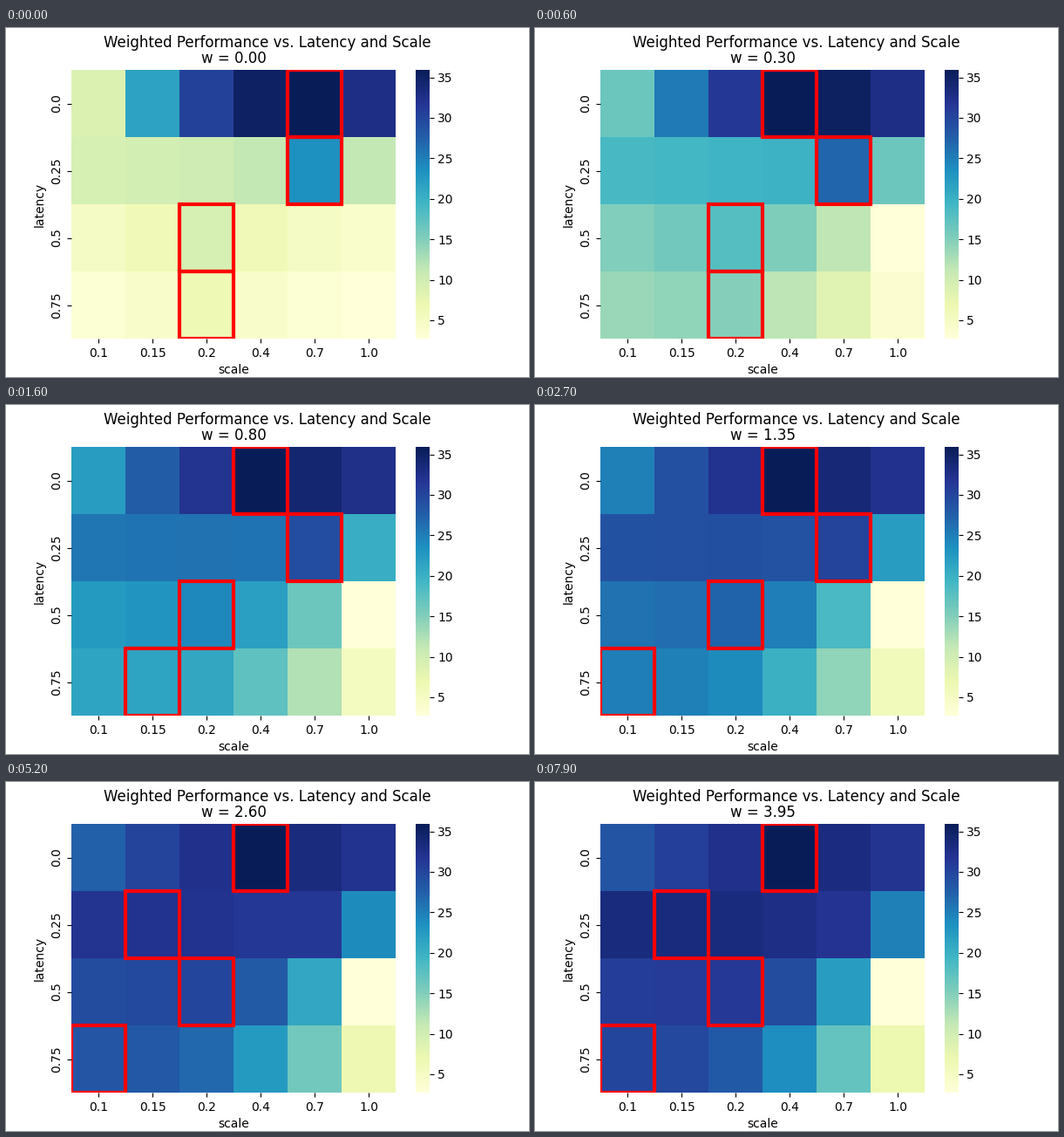
Recreate the animation shown at these times as a matplotlib script. Size 600x400 px, loop 8000 ms.

```python
import numpy as np
import matplotlib.pyplot as plt
from matplotlib.animation import FuncAnimation
from matplotlib.cm import ScalarMappable
from matplotlib.colors import Normalize
from matplotlib.patches import Rectangle

FRAMES, INTERVAL, STEP = 80, 100, 0.05
SCALES = ["0.1", "0.15", "0.2", "0.4", "0.7", "1.0"]
LATENCIES = ["0.0", "0.25", "0.5", "0.75"]
LOW, HIGH = 2.735, 35.919


def ridge(peak, top, fall, bend):
    """One curve per latency: highest at peak, lower by fall at the last scale."""
    peak, top, fall, bend = (np.array(p)[:, None] for p in (peak, top, fall, bend))
    last = len(SCALES) - 1
    away = np.abs(np.arange(last + 1) - peak) / (last - peak)
    return top - fall * away ** bend


# A cell scores base + 2 * w * gain.
base = ridge(peak=[3.7, 4, 2, 2], top=[1.03, 0.616, 0.156, 0.06],
             fall=[0.11, 0.4, 0.173, 0.121], bend=[2, 0.1, 0.5, 0.5])
gain = ridge(peak=[3, 0.5, 1, 0], top=[1, 1.02, 0.955, 0.93],
             fall=[0.123, 0.3, 0.955, 0.78], bend=[0.3, 4, 4, 2.5])


def scores(w):
    """Scores at weight w, stretched to the full colour range."""
    raw = base + 2 * w * gain
    unit = (raw - raw.min()) / (raw.max() - raw.min())
    return LOW + (HIGH - LOW) * unit


plt.rcParams["font.family"] = "DejaVu Sans"
fig, ax = plt.subplots(figsize=(6, 4), dpi=100)
fig.suptitle("Weighted Performance vs. Latency and Scale", fontsize=12)

norm = Normalize(LOW, HIGH)
mesh = ax.pcolormesh(scores(0), cmap="YlGnBu", norm=norm)
bar = fig.colorbar(ScalarMappable(norm, "YlGnBu"), ax=ax)
bar.outline.set_visible(False)

ax.invert_yaxis()
ax.spines[:].set_visible(False)
ax.set_xticks(np.arange(len(SCALES)) + 0.5, SCALES)
ax.set_yticks(np.arange(len(LATENCIES)) + 0.5, LATENCIES,
              rotation=90, va="center")
ax.set_xlabel("scale")
ax.set_ylabel("latency")
title = ax.set_title("w = 0.00", fontsize=12)

boxes = [
    ax.add_patch(Rectangle((0, row), 1, 1, fill=False, ec="red", lw=3))
    for row in range(len(LATENCIES))
]


def update(frame):
    w = frame * STEP
    values = scores(w)
    mesh.set_array(values)
    title.set_text(f"w = {w:.2f}")
    for box, best in zip(boxes, values.argmax(axis=1)):
        box.set_x(best)
    return [mesh, title, *boxes]


anim = FuncAnimation(fig, update, frames=FRAMES, interval=INTERVAL,
                     repeat=True, repeat_delay=0)
plt.show()
```
